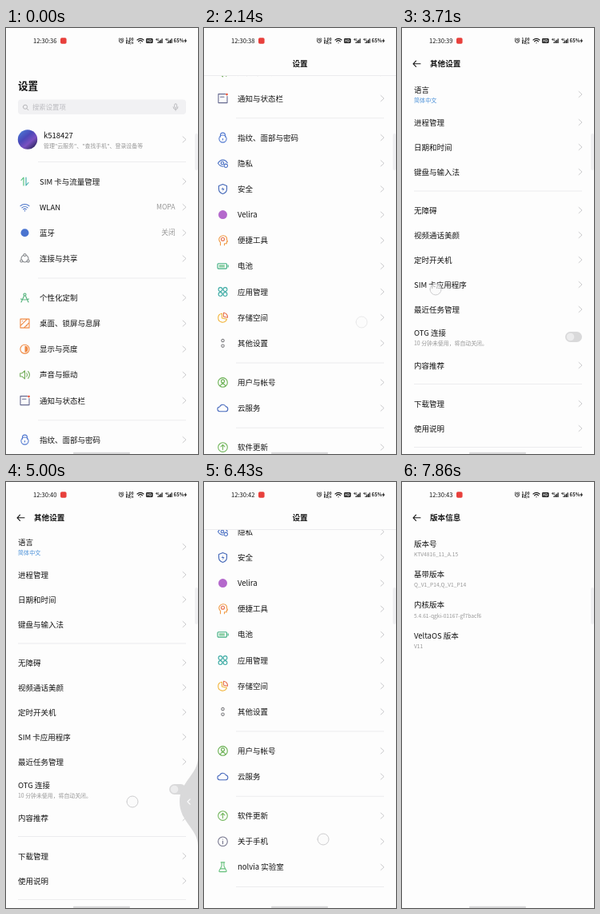
An HTML page with a canvas that plays this animation: 240x533 px, repeating every 8 s.

```html
<!DOCTYPE html>
<html lang="zh-CN">
<head>
<meta charset="utf-8">
<title>设置</title>
<style>
html, body { margin: 0; width: 100%; height: 100%; overflow: hidden; background: #fdfdfd; }
canvas { display: block; width: 100vw; height: 100vh; }
</style>
</head>
<body>
<canvas></canvas>
<script>
const W = 240, H = 533, LOOP = 8000, STEPS = 56;
const BG = '#fdfdfd', INK = '#141414', MUTED = '#979797', PALE = '#c6c6c8';
const SHADE = '#d9d9da', FIELD = '#f1f1f3', LINE = '#ececee';
const FONT = '"Noto Sans CJK SC", "Noto Sans CJK", "Noto Sans", sans-serif';
const canvas = document.querySelector('canvas');
const ctx = canvas.getContext('2d');

const clamp = v => Math.max(0, Math.min(1, v));
const ramp = (t, a, b) => clamp((t - a) / (b - a));
const easeOut = p => 1 - (1 - p) ** 3;
const mix = (a, b, p) => a + (b - a) * p;

// ---- drawing helpers ----
function text(str, x, y, size = 9.5, color = INK, weight = 500, align = 'left') {
  ctx.font = `${weight} ${size}px ${FONT}`;
  ctx.textAlign = align;
  ctx.fillStyle = color;
  ctx.fillText(str, x, y + size * 0.37);
}
function box(x, y, w, h, color, r = 0) {
  ctx.fillStyle = color;
  ctx.beginPath();
  ctx.roundRect(x, y, w, h, r);
  ctx.fill();
}
function stroke(d, x, y, color, width = 1.1) {
  ctx.save();
  ctx.translate(x, y);
  ctx.strokeStyle = color;
  ctx.lineWidth = width;
  ctx.lineCap = ctx.lineJoin = 'round';
  ctx.stroke(new Path2D(d));
  ctx.restore();
}
function fill(d, x, y, color) {
  ctx.save();
  ctx.translate(x, y);
  ctx.fillStyle = color;
  ctx.fill(new Path2D(d));
  ctx.restore();
}
const ring = (r, x = 0, y = 0) => `M${x - r} ${y}a${r} ${r} 0 1 0 ${2 * r} 0a${r} ${r} 0 1 0 ${-2 * r} 0`;
const square = (x, y, w, h) => `M${x} ${y}h${w}v${h}h${-w}z`;
const chevron = y => stroke('M-2-3.6L2 0L-2 3.6', 223, y, PALE, 0.9);
const divider = (x, y, end = 225) => box(x, y - 0.5, end - x, 1, LINE);

// ---- icons: [color, path, filled] layers around the origin ----
const SHIELD = 'M0-6L5-4V0C5 3 3 5 0 6C-3 5-5 3-5 0V-4z';
const ICONS = {
  sim: [['#4fbf78', 'M-1.5 5V-5L-4.5-1.5'], ['#3aaea8', 'M1.5-5V5L4.5 1.5']],
  wlan: [['#4a74c8', 'M-5.5-1.5a8 8 0 0 1 11 0M-3.6 .8a5.2 5.2 0 0 1 7.2 0M-1.8 2.8a2.6 2.6 0 0 1 3.6 0'], ['#4a74c8', ring(0.8, 0, 4.6), 1]],
  dot: [['#4a74d0', ring(5), 1]],
  share: [['#85888c', ring(4.5)], [BG, ring(1.7, 0, -4.5) + ring(1.7, -4.2, 3) + ring(1.7, 4.2, 3), 1],
    ['#85888c', ring(1.5, 0, -4.5) + ring(1.5, -4.2, 3) + ring(1.5, 4.2, 3)]],
  style: [['#4fb078', ring(1.5, 0, -4) + 'M-.8-2.6L-4.5 5.5M.8-2.6L4.5 5.5M-5 1.5Q0 3.5 5 1.5']],
  desk: [['#f08a44', square(-5.5, -5.5, 11, 11) + 'M-5.5 3L3-5.5M-1 5.5L5.5-1M-3-3h.2M2.5 3h.2']],
  display: [['#f08a44', ring(5.6)], ['#f08a44', 'M0-4a4 4 0 0 1 0 8z', 1]],
  sound: [['#74ae5c', 'M-5.8-2h2.3L0-5V5L-3.5 2H-5.8zM2.3-2.2q1.6 2.2 0 4.4M4.2-4.4q3.4 4.4 0 8.8']],
  notice: [['#666a90', 'M3-5.5H-5.5V5.5H5.5V-2.5M-3-1.8H1.5'], ['#e8553c', ring(1.4, 5, -5), 1]],
  lock: [['#5078d0', 'M-3-1V-3a3 3 0 0 1 6 0V-1M0 1.3v1.6' + ring(4.6, 0, 1.4)]],
  privacy: [['#4a70c4', 'M5.8-.5C3-5.5-3-5.5-6 0C-4 3.2-2 4 .5 4' + ring(1.8, -0.5, -0.3)], ['#4a70c4', ring(2.2, 3.8, 3)]],
  safe: [['#4468b8', SHIELD], ['#4468b8', 'M.6-3L-1.8.6H.4L-.4 3.2L2-.4H-.2z', 1]],
  helper: [['#b468cc', ring(5.5), 1]],
  tools: [['#f09a44', 'M-3 6V2.5C-7-2-3-6 .5-6C4-6 5.5-3.5 5-1L6 1.5H4.8V4H2V6'], ['#e8704a', ring(2, 0, -1.5)]],
  battery: [['#3cae80', 'M-5.5-3.2h9.5q1 0 1 1v4.4q0 1-1 1h-9.5q-1 0-1-1v-4.4q0-1 1-1zM6.7-1v2'], ['#8ccfa4', square(-4.7, -1.6, 7, 3.2), 1]],
  apps: [['#3caba4', [-3, 3].map(x => [-3, 3].map(y => ring(2.4, x, y)).join('')).join('')]],
  storage: [['#f2b43a', 'M-1-5A5.5 5.5 0 1 0 5 2L-1 .8z'], ['#e8704a', 'M1-6A5.6 5.6 0 0 1 6 0L1-1z']],
  other: [['#808084', ring(1.7, 0, -3.3) + ring(1.7, 0, 3.3)]],
  user: [['#68b050', ring(5.8) + ring(2, 0, -1.5) + 'M-3.4 4.4Q0-1 3.4 4.4']],
  cloud: [['#4668bc', 'M-3.5 4.2a2.9 2.9 0 0 1-.3-5.8a4 4 0 0 1 7.5-.3a3.1 3.1 0 0 1 .1 6.1z']],
  update: [['#72b65c', ring(5.8) + 'M0 3V-3M-2.4-.8L0-3.2L2.4-.8']],
  about: [['#74748c', ring(5.8) + 'M0-.5V3M0-2.8v.1']],
  lab: [['#66c07c', 'M-2.3-6h4.6M-1.4-6V-1.5L-4.5 4.5q-.5 1.2.8 1.2h7.4q1.3 0 .8-1.2L1.4-1.5V-6M-3 2h6']],
};
const icon = (name, x, y) => ICONS[name].forEach(([color, d, solid]) => (solid ? fill : stroke)(d, x, y, color));

// ---- home page; each group is followed by a divider ----
const HOME = [
  [['sim', 'SIM 卡与流量管理'], ['wlan', 'WLAN', 'MOPA'], ['dot', '蓝牙', '关闭'], ['share', '连接与共享']],
  [['style', '个性化定制'], ['desk', '桌面、锁屏与息屏'], ['display', '显示与亮度'], ['sound', '声音与振动'], ['notice', '通知与状态栏']],
  [['lock', '指纹、面部与密码'], ['privacy', '隐私'], ['safe', '安全'], ['helper', 'Velira'], ['tools', '便捷工具'],
    ['battery', '电池'], ['apps', '应用管理'], ['storage', '存储空间'], ['other', '其他设置']],
  [['user', '用户与帐号'], ['cloud', '云服务']],
  [['update', '软件更新'], ['about', '关于手机'], ['lab', 'nolvia 实验室']],
];
const homeScroll = t =>
  6 * ramp(t, 1000, 1142) + 372 * easeOut(ramp(t, 1143, 2120)) + 107 * easeOut(ramp(t, 5700, 6300));

function profile(y) {
  const shade = ctx.createLinearGradient(18, y - 9, 35, y + 11);
  [[0, '#4a70d0'], [0.35, '#4a48b8'], [0.65, '#7a50c0'], [1, '#2c2660']].forEach(s => shade.addColorStop(...s));
  box(14.8, y - 12.2, 24.4, 24.4, shade, 12.2);
  text('k518427', 47, y - 5.5);
  text('管理"云服务"、"查找手机"、登录设备等', 47, y + 7.5, 6.95, MUTED, 400);
  chevron(y);
}
function home(t) {
  const s = homeScroll(t), top = Math.max(59, 112 - s);
  ctx.save();
  ctx.beginPath();
  ctx.rect(0, top, W, H - top);
  ctx.clip();
  profile(139.5 - s);
  divider(40, 167.5 - s);
  let y = 192 - s;
  for (const group of HOME) {
    for (const [name, label, value] of group) {
      icon(name, 23.5, y);
      text(label, 42, y);
      if (value) text(value, 211.5, y, 8.6, MUTED, 400, 'right');
      chevron(y);
      y += 32.15;
    }
    divider(40, y - 7.5);
    y += 16.9;
  }
  ctx.restore();

  const barHeight = 18.5 - s * 0.5;
  if (barHeight > 0) {
    const mid = 89.5 + barHeight / 2;
    box(15, 89.5, 210, barHeight, FIELD, Math.min(4, barHeight / 2));
    ctx.globalAlpha = clamp(1 - s / 14);
    stroke(ring(2.6) + 'M2 2L4 4', 24, mid, '#b0b0b4', 0.9);
    text('搜索设置项', 33, mid, 8.4, '#bcbcc0', 400);
    stroke('M-1.4-2.6a1.4 1.4 0 0 1 2.8 0V0a1.4 1.4 0 0 1-2.8 0zM-3 0a3 3 0 0 0 6 0M0 3V4.6', 212, mid, '#b0b0b4', 0.8);
    ctx.globalAlpha = 1;
  }
  const p = ramp(s, 10, 60);
  text('设置', mix(15, 110.4, p), mix(72.5, 44.5, p), mix(12.6, 9.6, p), INK, 700);
  if (p === 1) divider(0, 59.5, W);
}

// ---- sub pages ----
function heading(title) {
  box(0, 0, W, 60, BG);
  stroke('M4.5 0H-4.5M-1-3.6L-4.5 0L-1 3.6', 18.5, 44.8, INK);
  text(title, 35, 44.8, 9.6, INK, 700);
}
function other(t) {
  const p = ramp(t, 3720, 4500);
  const s = 2 * ramp(t, 3720, 4000) + 14 * Math.sin(Math.PI * p);
  const rows = (y, labels) => labels.forEach((label, i) => {
    text(label, 15, y + 31 * i - s);
    chevron(y + 31 * i - s);
  });
  text('语言', 15, 77 - s);
  text('简体中文', 15, 90.5 - s, 7.1, '#4a90d8', 400);
  chevron(83 - s);
  rows(118, ['进程管理', '日期和时间', '键盘与输入法']);
  rows(228, ['无障碍', '视频通话美颜', '定时开关机', 'SIM 卡应用程序', '最近任务管理']);
  text('OTG 连接', 15, 381.5 - s);
  text('10 分钟未使用，将自动关闭。', 15, 394.5 - s, 6.9, MUTED, 400);
  box(204, 380 - s, 21, 13, SHADE, 6.5);
  fill(ring(4.8), 210.5, 386.5 - s, '#ececed');
  rows(422, ['内容推荐']);
  rows(470, ['下载管理', '使用说明']);
  [204, 445.5, 524.5].forEach(y => divider(15, y - s));
  heading('其他设置');
}
function about() {
  ['版本信息', '状态信息', '法律信息'].forEach((label, i) => {
    text(label, 15, 80 + 31 * i);
    chevron(80 + 31 * i);
  });
  heading('关于手机');
}
function version() {
  [['版本号', 'KTV4816_11_A.15'], ['基带版本', 'Q_V1_P14,Q_V1_P14'],
    ['内核版本', '5.4.61-qgki-01167-gf7bacf6'], ['VeltaOS 版本', 'V11']].forEach(([label, value], i) => {
    text(label, 15, 77 + 38.4 * i);
    text(value, 15, 90.5 + 38.4 * i, 6.7, MUTED, 400);
  });
  heading('版本信息');
}

// ---- navigation: start, end, from, to, going back ----
const NAV = [
  [2710, 3080, home, other],
  [5140, 5500, other, home, true],
  [6560, 6860, home, about],
  [7280, 7640, about, version],
];
function page(draw, t, x) {
  ctx.save();
  ctx.translate(x, 0);
  box(0, 0, W, H, BG);
  draw(t);
  ctx.restore();
}
function pages(t) {
  const move = NAV.filter(n => t >= n[0]).pop();
  if (!move) return page(home, t, 0);
  const [start, end, from, to, back] = move;
  if (t >= end) return page(to, t, 0);
  const e = easeOut(ramp(t, start, end)), shown = back ? 1 - e : e;
  page(back ? to : from, t, -70 * shown);
  box(0, 0, W, H, `rgba(0,0,0,${0.12 * shown})`);
  page(back ? from : to, t, W * (1 - shown));
}

// ---- system overlays ----
function statusBar(t) {
  const seconds = 36 + Math.max(0, Math.floor((t - 70) / 1000));
  text('12:30:' + seconds, 34, 16, 7.6, INK, 500);
  box(68, 12.2, 7.6, 7.6, '#e8403c', 1.8);
  stroke(ring(2.5) + 'M0-1.3V.2H1.2M-3-2.3L-2-3.2M3-2.3L2-3.2', 144, 16, INK, 0.8);
  text('1.00', 154.5, 13.8, 4.8, INK, 700, 'center');
  text('KB/s', 154.5, 18.2, 4.2, INK, 700, 'center');
  stroke('M-4-1a5.8 5.8 0 0 1 8 0M-2.5.8a3.6 3.6 0 0 1 5 0M0 2.6v.1', 168, 16, INK);
  box(175, 13, 8.5, 6, INK, 1.2);
  text('HD', 179.2, 16, 4.2, BG, 700, 'center');
  for (const x of [187, 199]) {
    text('4G', x, 14.2, 3.6, INK, 700);
    for (let i = 0; i < 4; i++) box(x + 2.4 + i * 1.7, 17.5 - i * 1.4, 1.2, 1.5 + i * 1.4, INK);
  }
  text('65%', 209.6, 16, 6, INK, 700);
  fill('M.8-3L-2 .5H-.2L-.8 3L2-.6H.2z', 224.3, 16, INK);
}
function backGesture(t) {
  const grow = t <= 5000 ? easeOut(ramp(t, 4700, 4990)) : 1 - ramp(t, 5000, 5140);
  if (grow <= 0) return;
  const x = -23 * grow;
  fill(`M0-55C0-34 ${x}-25 ${x} 0C${x} 25 0 34 0 55z`, 240, 400, SHADE);
  stroke('M1.6-3.2L-1.6 0L1.6 3.2', 240 + x / 2, 400, '#fff');
}

// start, end, x, y, end x, end y, opacity
const TOUCHES = [
  [1000, 1143, 162, 469, 162, 463], [1143, 1500, 162, 463, 180, 280],
  [2000, 2290, 197, 368, 197, 368, 0.4],
  [2560, 2720, 130, 394, 130, 394],
  [3560, 3720, 42, 327, 42, 327], [3720, 4150, 42, 327, 52, 280],
  [4700, 5000, 236, 404, 158, 400], [5000, 5100, 158, 400, 158, 400],
  [5690, 5990, 150, 430, 156, 330],
  [6420, 6560, 149, 447, 149, 447],
  [7130, 7280, 120, 80, 120, 80],
];
function touch(t) {
  for (const [a, b, x0, y0, x1, y1, opacity = 1] of TOUCHES) {
    if (t < a || t >= b) continue;
    const p = ramp(t, a, b), x = mix(x0, x1, p), y = mix(y0, y1, p);
    ctx.globalAlpha = opacity;
    fill(ring(7), x, y, 'rgba(250,250,250,.6)');
    stroke(ring(7), x, y, '#c8c8ca', 0.9);
    ctx.globalAlpha = 1;
  }
}

function render(t) {
  const ratio = window.devicePixelRatio || 1;
  const width = Math.round(innerWidth * ratio), height = Math.round(innerHeight * ratio);
  if (canvas.width !== width || canvas.height !== height) Object.assign(canvas, { width, height });
  ctx.setTransform(width / W, 0, 0, height / H, 0, 0);
  pages(t);
  backGesture(t);
  statusBar(t);
  box(236, 132, 4, 46, '#f0f0f2', 2);
  box(84, 530.8, 71, 2.2, SHADE, 1);
  touch(t);
}

const started = performance.now();
function loop() {
  const t = (performance.now() - started) % LOOP;
  const step = Math.floor((t + 5) / LOOP * STEPS) % STEPS;
  render(step * LOOP / STEPS);
  requestAnimationFrame(loop);
}
loop();
</script>
</body>
</html>
```
